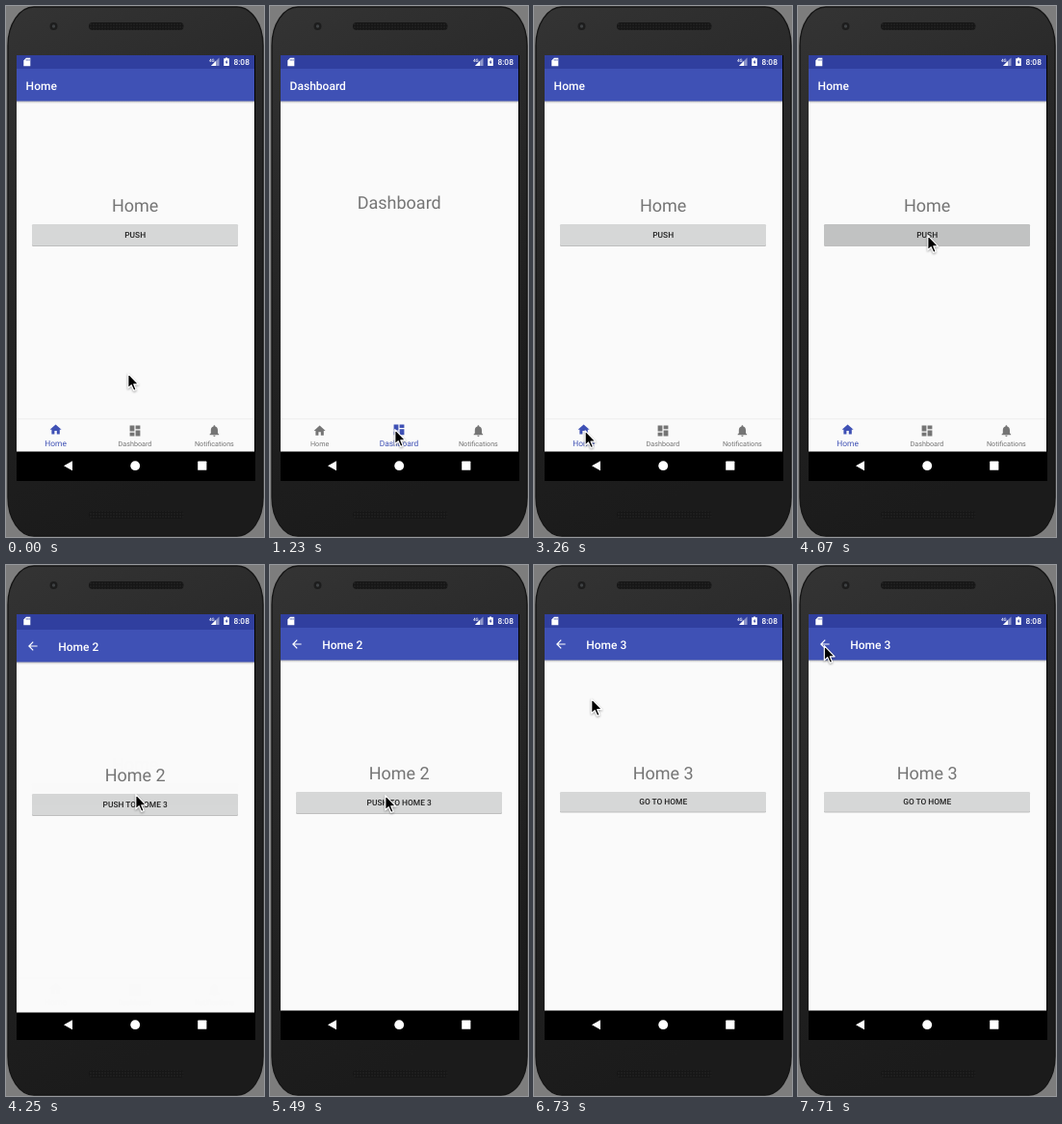
Write an HTML page that moves like this. It is 268 px wide and 550 px high and loops after 8000 ms.

```html
<!DOCTYPE html>
<html lang="en">
<head>
<meta charset="utf-8">
<title>Tab and push navigation</title>
<style>
  html, body { margin: 0; width: 100%; height: 100%; overflow: hidden; background: #7d7d7d; }
  svg { display: block; width: 100%; height: 100%; }
  text { font-family: Roboto, sans-serif; text-rendering: geometricPrecision; }
  .medium { font-weight: 500; }
  .mid { text-anchor: middle; }
</style>
</head>
<body>
<svg id="stage" viewBox="0 0 268 550"></svg>
<script>
const ICONS = {
  home: 'M10 20v-6h4v6h5v-8h3L12 3 2 12h3v8z',
  dash: 'M3 13h8V3H3zm0 8h8v-6H3zm10 0h8V11h-8zm0-18v6h8V3z',
  bell: 'M12 22c1.1 0 2-.9 2-2h-4c0 1.1.9 2 2 2zm6-6v-5c0-3.1-1.6-5.6-4.5-6.3V4c0-.8-.7-1.5-1.5-1.5s-1.5.7-1.5 1.5v.7C7.6 5.4 6 7.9 6 11v5l-2 2v1h16v-1z',
  back: 'M20 11H7.8l5.6-5.6L12 4l-8 8 8 8 1.4-1.4L7.8 13H20z'
};

const icon = (name, x, y, fill) =>
  `<path d="${ICONS[name]}" fill="${fill}" transform="translate(${x - 7.2} ${y - 7.2}) scale(.6)"/>`;

const rect = (x, y, w, h, fill, extra = '') =>
  `<rect x="${x}" y="${y}" width="${w}" height="${h}" fill="${fill}" ${extra}/>`;

const text = (s, x, y, size, fill, cls = '') =>
  `<text x="${x}" y="${y}" font-size="${size}" fill="${fill}" class="${cls}">${s}</text>`;

const button = (label, y, h) =>
  rect(27, y + .9, 214, h, '#000', 'rx="1.2" opacity=".24"') +
  rect(27, y, 214, h, '#d6d7d7', 'rx="1.2"') +
  rect(27, y, 214, h, '#000', 'rx="1.2" opacity="0" class="press"') +
  text(label, 134.2, y + h / 2 + 2.8, 8.4, '#212121', 'medium mid');

// Title and body of one page; pages with a parent get a back arrow
const page = (title, headingY, push = '', back = false) =>
  text(title, back ? 54.2 : 20.6, 86.5, 12, '#fff', 'medium') +
  (back ? icon('back', 27.8, 82, '#fff') : '') +
  text(title, 134.2, headingY, 18, '#757575', 'mid') + push;

const appWindow = (id, content) => `<g id="${id}">
  ${rect(11, 98, 247, 364, '#fafafa')}
  ${rect(11, 98, 247, 3, 'url(#shade)')}
  ${rect(11, 65, 247, 33.5, '#3f51b5')}
  ${rect(11, 51, 247, 14, '#303f9f')}
  ${content}
  ${rect(11, 461.5, 248, 60, '#000')}
</g>`;

const TABS = [['home', 'Home', 51.6], ['dash', 'Dashboard', 134], ['bell', 'Notifications', 216.4]];
const tabs = rect(11, 427.4, 247, .8, '#ececec') + TABS.map(([name, label, x]) =>
  `<g class="tab"><g>${icon(name, x, 440, 'inherit')}</g>${text(label, x, 455.8, 7.2, 'inherit', 'mid')}</g>`).join('');

const speaker = y =>
  rect(86, y, 98.5, 8, '#161616', 'rx="4"') +
  rect(86, y, 98.5, 8, 'url(#mesh)', 'rx="4"');

const stage = document.getElementById('stage');
stage.innerHTML = `
  <defs>
    <linearGradient id="body" x2=".25" y2="1">
      <stop stop-color="#343434"/><stop offset=".35" stop-color="#292929"/>
      <stop offset=".8" stop-color="#1e1e1e"/><stop offset="1" stop-color="#1b1b1b"/>
    </linearGradient>
    <linearGradient id="shade" x2="0" y2="1">
      <stop stop-color="#000" stop-opacity=".3"/><stop offset="1" stop-color="#000" stop-opacity="0"/>
    </linearGradient>
    <pattern id="mesh" width="3" height="3" patternUnits="userSpaceOnUse">
      <circle cx="1" cy="1" r=".7" fill="#2c2c2c"/>
    </pattern>
    <clipPath id="screen">${rect(11, 51, 248, 441, '#000')}</clipPath>
  </defs>
  ${rect(0, 0, 268, 550, '#7d7d7d')}
  ${rect(2, 1, 265, 548, 'url(#body)', 'rx="27" ry="40" stroke="#151515" stroke-width="1.4"')}
  <circle cx="49.5" cy="21" r="4" fill="#1d1d1d"/><circle cx="49.5" cy="21" r="1.7" fill="#3f4244"/>
  ${speaker(17)}${speaker(523)}
  ${rect(11, 51, 248, 441, '#000')}
  <g clip-path="url(#screen)">
    ${appWindow('root',
      `<g class="page">${page('Home', 213.2, button('PUSH', 226, 22))}</g>
       <g class="page">${page('Dashboard', 209.6)}</g>
       <g class="page">${page('Notification', 209.6)}</g>` + tabs)}
    ${appWindow('second', page('Home 2', 221.8, button('PUSH TO HOME 3', 235, 22), true))}
    ${appWindow('third', page('Home 3', 221.8, button('GO TO HOME', 235, 20.5), true))}
  </g>
  <g fill="#fff">
    <path d="M20.9 53.7H25.3V62.2H18.3V56.5z"/>
    <path d="M21.2 55v1.8M22.8 55v1.8M24.2 55v1.8" stroke="#303f9f" stroke-width=".6"/>
    <path d="M221.5 53.5V62H213z" opacity=".45"/><path d="M218 57V62H213z"/>
    ${text('4G', 211, 57.6, 4.6, '#fff', 'medium')}
    <path d="M228 53.4h2v.9h1.8V62h-5.6v-7.7H228z"/>
    <path d="M229.5 55.8l-1.8 2.8h1.1v2l1.7-2.8h-1z" fill="#303f9f"/>
    ${text('8:08', 236.4, 61.4, 8.4, '#fff', 'medium')}
    <path d="M60 476.3L69 471.3V481.3z"/>
    <circle cx="134.2" cy="476.2" r="4.9"/>
    ${rect(199.2, 471.6, 9.2, 9.2, '#fff', 'rx=".6"')}
  </g>
  <g id="cursor" stroke-linejoin="round">
    <path id="arrow" d="M0 0V15.2L3.4 12 6 17.7 8.4 16.7 6 11.1H10.8z" stroke="#fff" stroke-width="1.2"/>
  </g>`;

const byId = id => document.getElementById(id);
const all = selector => [...stage.querySelectorAll(selector)];
const pages = all('.page'), tabEls = all('.tab'), presses = all('.press');
const second = byId('second'), third = byId('third'), cursor = byId('cursor');
byId('arrow').style.filter = 'drop-shadow(0 1px .8px rgba(0,0,0,.35))';

const LOOP = 8000;
const SWITCHES = [[0, 0], [1100, 1], [1900, 2], [2960, 0]];   // time, tab
const PUSHES = [[second, 4104], [third, 5812]];
const PATH = [                                                // time, x, y
  [180, 126, 380], [400, 124, 398], [620, 127, 424], [790, 131, 439], [880, 129, 438],
  [1310, 129, 438], [1760, 204, 443], [2120, 204, 443], [2380, 125, 449],
  [2730, 58, 444], [2820, 52, 441], [3260, 52, 440], [3530, 134, 237],
  [4520, 134, 237], [5000, 35, 118], [5400, 117, 233], [5490, 119, 238],
  [6470, 119, 238], [6730, 59, 138], [7000, 39, 106], [7350, 29, 87],
  [7440, 27, 83], [7690, 27, 83], [7710, 26.5, 83]
];

const clamp = v => Math.min(1, Math.max(0, v));
const mix = (a, b, k) => a + (b - a) * k;

function cursorAt(t) {
  const i = PATH.findIndex(p => p[0] > t);
  if (i === 0) return PATH[0].slice(1);
  if (i < 0) return PATH[PATH.length - 1].slice(1);
  const [t0, x0, y0] = PATH[i - 1], [t1, x1, y1] = PATH[i];
  const k = (t - t0) / (t1 - t0);
  return [mix(x0, x1, k), mix(y0, y1, k)];
}

function drawTabs(t) {
  const n = SWITCHES.filter(s => s[0] <= t).length - 1;
  const [since, active] = SWITCHES[n];
  const previous = n ? SWITCHES[n - 1][1] : active;
  const k = n ? clamp((t - since) / 115) : 1;
  pages.forEach((el, i) => el.style.display = i === active ? '' : 'none');
  tabEls.forEach((el, i) => {
    const grow = i === active ? k : i === previous ? 1 - k : 0;
    el.setAttribute('fill', i === active ? '#3f51b5' : '#757575');
    el.firstChild.setAttribute('transform', `translate(0 ${-1.2 * grow})`);
    el.lastChild.setAttribute('font-size', mix(7.2, 8.4, grow));
  });
}

// A new window fades in while sliding up the last 8% of the screen
function drawPush([win, start], t, press) {
  const slide = Math.round(35 * (1 - clamp((t - start) / 350)) ** 5);
  win.style.display = t < start ? 'none' : '';
  win.setAttribute('opacity', 1 - (1 - clamp((t - start) / 200)) ** 4);
  win.setAttribute('transform', `translate(0 ${slide})`);
  press.setAttribute('opacity', .1 * clamp((t - start + 130) / 100) * (t < start + 350));
}

function draw(now) {
  const t = now % LOOP;
  drawTabs(t);
  PUSHES.forEach((p, i) => drawPush(p, t, presses[i]));
  const [x, y] = cursorAt(t);
  cursor.setAttribute('transform', `translate(${x + .8} ${y + .7})`);
  requestAnimationFrame(draw);
}
draw(0);
</script>
</body>
</html>
```
